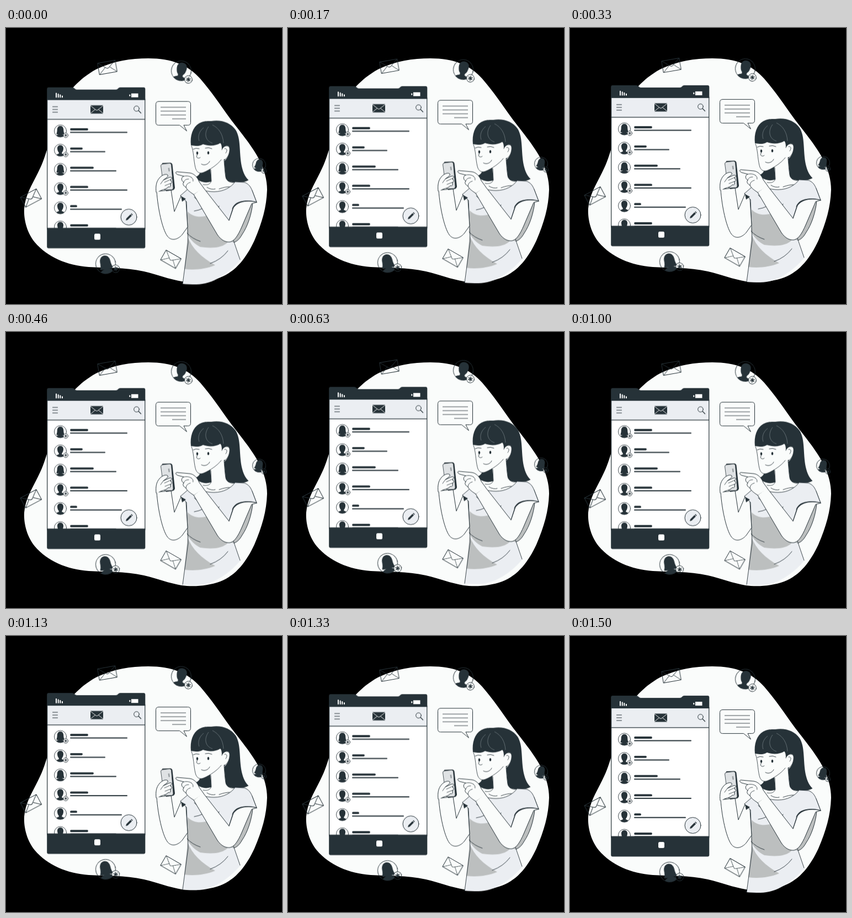
Animation of 500 by 500 pixels, one loop 1540 ms. Source, as an HTML page:

```html
<!DOCTYPE html>
<html lang="en">
<head>
<meta charset="utf-8">
<title>Mail contacts</title>
<style>
html, body { margin: 0; width: 100%; height: 100%; overflow: hidden; background: #000; }
svg { display: block; width: 100vw; height: 100vh; }
.ink { fill: #263238; }
.pale { fill: #ebeef2; }
.skin { fill: #fafcfb; }
.shade { fill: #bcbfbf; }
.line { fill: none; stroke: #263238; stroke-linecap: round; stroke-linejoin: round; }
.edge { stroke: #263238; stroke-linejoin: round; stroke-linecap: round; }
</style>
</head>
<body>
<svg viewBox="0 0 500 500">
  <defs>
    <clipPath id="disc"><circle r="18"/></clipPath>
    <clipPath id="list"><path d="M75 165H252V362H75Z"/></clipPath>
    <mask id="bite" maskUnits="userSpaceOnUse" x="-20" y="-20" width="50" height="50">
      <path fill="#fff" d="M-20-20H30V30H-20Z"/><circle cx="15.9" cy="12.7" r="7"/>
    </mask>
    <g id="man">
      <path class="ink" d="M-9-4C-9.500-11-6-15 0-15C6-15 9.500-11 9-4C8.500 1 7 5 4.500 7V10C8 11 13 13 15 18H-15C-13 13-8 11-4.500 10V7C-7 5-8.500 1-9-4Z"/>
    </g>
    <g id="woman">
      <path class="ink" d="M-9.500-3C-9.500-10-6-15 0-15C6-15 9.500-10 9.500-3C9.500 3 11 6 12 9C9 10 6 10 4 9.500C9 11 13 13 15 18H-15C-13 13-9 11-4 9.500C-6 10-9 10-12 9C-11 6-9.500 3-9.500-3Z"/>
    </g>
    <g id="badge">
      <circle class="line" cx="15.900" cy="12.700" r="7"/>
      <path class="line" stroke-width="1.600" d="M15.900 9V16.400M12.700 10.900L19.100 14.500M12.700 14.500L19.100 10.900"/>
    </g>
    <g id="letter">
      <path class="line" d="M-16-10.500H16V10.500H-16ZM-16-10.500L-2 1Q0 2.500 2 1L16-10.500M-16 10.500L-4-.5M16 10.500L4-.5"/>
    </g>
  </defs>

  <path class="skin" d="M258 55C300 55 330 67 352 92C372 115 388 139 406 164C420 183 446 213 459 239C468 257 473 275 473 293C472 325 464 352 450 385C436 415 417 441 388 452C366 460 340 462 318 459C295 455 275 447 250 441C215 433 180 435 150 433C110 430 75 415 52 388C36 368 32 343 33 327C35 303 46 286 58 262C68 242 71 230 75 218C85 185 88 150 112 120C122 105 142 86 165 74C195 60 225 55 258 55Z"/>

  <g id="float">
    <use href="#letter" transform="translate(183.700 70.800) rotate(-10)"/>
    <use href="#letter" transform="translate(45.300 307.500) rotate(-28) scale(1.020 .98)"/>
    <use href="#letter" transform="translate(298.800 418.500) rotate(30) scale(.97)"/>
    <g id="faces"></g>

    <g id="phone">
      <path d="M75 130H252V365H75Z" fill="#fff"/>
      <path class="pale" d="M75 130H252V165H75Z"/>
      <path class="line" d="M74.700 128V364M251.800 128V364M75 164.800H252" stroke-width="1.200"/>
      <path class="ink" d="M74.200 130V110Q74.200 107 77.200 107H120Q122.500 107 124 108.800T128 111H199Q201.500 111 203 109T207 107H249.300Q252.300 107 252.300 110V130Z"/>
      <path class="ink" d="M74.200 361.500H252.300V395.500Q252.300 398.500 249.300 398.500H77.200Q74.200 398.500 74.200 395.500Z"/>
      <rect x="160" y="372" width="11" height="11" rx="2.500" fill="#fff"/>
      <path fill="#fff" d="M90 117h2v8.500h-2zM93.700 118.500h2v7h-2zM97.300 120h2v5.500h-2zM101 122h2v3.500h-2zM227 118h12.500v7H227zM223.300 120h2v3h-2z"/>
      <path class="line" d="M84.500 142H93.500M84.500 147H93.500M84.500 152H93.500"/>
      <path class="ink" d="M153 139.500H176V154.500H153Z"/>
      <path d="M153 140L163 148Q164.500 149 166 148L176 140M153 154L161.500 147M176 154L167.500 147" fill="none" stroke="#fff" stroke-width=".9"/>
      <circle class="line" cx="236.500" cy="145.500" r="4.800"/>
      <path class="line" d="M240 149L244.500 153.500" stroke-width="1.300"/>
      <g id="rows" clip-path="url(#list)"></g>
      <circle class="pale edge" cx="222.500" cy="342" r="14.500"/>
      <path class="ink" d="M217 348L218 344.500L225.500 337L228 339.500L220.500 347ZM226.200 336.300L227.300 335.200L229.800 337.700L228.700 338.800Z"/>
    </g>

    <path class="skin edge" d="M276.500 132.500H329.500Q334.500 132.500 334.500 137.500V170.500Q334.500 175.500 329.500 175.500H322L327.500 186L314.500 175.500H276.500Q271.500 175.500 271.500 170.500V137.500Q271.500 132.500 276.500 132.500Z"/>
    <path d="M280 143H326M280 150H326M280 157H326M301 164H326" stroke="#80878a" stroke-width="1.500"/>

    <g id="girl">
      <path class="ink" d="M335 212C333 195 338 179 350 172C358 167 368 168 372 168C390 165 407 171 416 184C426 200 422 225 427 250C430 263 434 270 439.500 275C430 281 410 280 402 277L392 262L371 278C360 281 350 278 342 270C350 267 352 262 352 258L360 215Z"/>
      <path class="skin" d="M370 253L372 277Q369 285 357 283L340 290L375 300L412 290L416 279Q401 281 398 271L395 238L388 236Z"/>
      <path class="skin" d="M336 213C340 222 340 240 343 252C345 261 351 264 358 261C370 256 383 247 390 238L396 240C402 235 406 225 405 217C404 211 396 211 391 220C391 213 390 209 388 208C380 213 368 214 357 210C350 214 343 214 336 213Z"/>
      <path class="line" d="M336 213C340 222 340 240 343 252C345 261 351 264 358 261C370 256 383 247 390 238M391 220C392 213 403 210 405 217C406 225 402 235 396 238M396 218C400 217 402 221 398 226M371 256L372 277C369 284 363 284 357 283M395 238C396 255 397 266 399 273Q404 281 415 279" stroke-width=".8"/>
      <path class="line" d="M346 224C348 229 344 232 346 234C348 236 351 235 352 234M354 246C359 249 366 247 369 241M339 219Q344 216 350 218M361 217Q367 215 373 218M364 288Q372 293 379 291M386 291Q397 287 405 287" stroke-width=".9"/>
      <ellipse class="ink" cx="346.500" cy="226" rx="1.800" ry="2.800"/>
      <ellipse class="ink" cx="366.500" cy="225.500" rx="1.800" ry="2.800"/>
      <circle class="ink" cx="396" cy="238" r="1"/>
      <path d="M358 180C350 186 347 196 350 204M367 178C358 190 361 204 374 208M374 175C386 181 393 192 394 208" fill="none" stroke="#7c878c" stroke-width=".7"/>

      <path class="shade edge" d="M447 316C445 338 437 360 428 373C422 384 416 388 408 389L400 375L425 318Z"/>
      <path class="pale" d="M338 284C347 291 361 296 377 296C394 296 408 288 415 278L432 279C440 282 443 287 446 294L454 315L425 317L412 326L404 386L413 388L424 420C404 444 374 464 345 464Q330 464 320 463L330 388L327 314L316 303Z"/>
      <path class="shade" d="M329 332C341 344 355 342 366 339L385 370L402 387C393 398 372 399 352 396C342 391 334 383 328 373ZM329 377C337 399 354 415 379 429C360 437 340 438 323 436Z"/>
      <path class="line" d="M338 284C347 291 361 296 377 296C394 296 408 288 415 278L432 279C440 282 443 287 446 294L454 315M338 284L316 303L327 314L330 388L320 463M412 384L424 419M341 331Q349 330 357 326M402 403Q390 419 370 426M328 371Q337 381 352 386M341 306Q351 316 365 319M375 334Q383 330 386 322" stroke-width=".9"/>

      <path class="skin edge" d="M273 296C275 326 283 363 292 376C300 387 312 382 319 374L329 360L326 313L317 304L305 332L299 293Z"/>
      <path class="skin edge" d="M454 315C438 311 420 313 412 325L404 348L357 288L340 301L383 374C390 384 398 388 406 387C414 385 420 376 427 360L445 318Z"/>
      <path class="pale" d="M454 315C438 309 420 312 410 326L405 315L415 300L446 294Z"/>
      <path class="line" d="M454 315C438 310 420 312 411 326L404 348M446 294L454 315M327 314L316 303"/>
      <path class="ink" d="M440 313C425 313 417 317 409 328C413 316 425 311 440 313ZM317 304L326 309L319 314Z"/>

      <path class="ink" d="M283 244L298 243.500Q301 244 301.500 247L306 289Q305 293 301 293.500L290 295Z"/>
      <path d="M283 246L296 244.500Q299 244.500 299.500 247L303 289Q303 292 300 292.500L290 293Q286 293 286 290L280.500 249Q280.500 246.500 283 246Z" fill="#dfe2e4" class="edge" stroke-width=".8"/>
      <path d="M293.500 253L296 252.700L297 259L294.500 259.300Z" fill="#9aa0a3"/>
      <path class="skin edge" d="M272 297C271 286 272 278 278 271C283 265 291 263 293 266C295 269 288 272 285 275L296 270C301 269 302 272 298 274L299 277C302 278 300 281 298 281L298 284C299 287 296 288 294 287C291 292 283 292 278 295"/>
      <path class="line" d="M285 275L280 282M298 274L287 279M298 281L288 285" stroke-width=".8"/>

      <path class="skin edge" d="M340 301C334 297 328 293 326 288C322 286 319 282 322 279C317 276 317 270 322 268L311 265C306 263 307 259 311 260L333 262C341 263 347 270 350 278L358 289"/>
      <path class="line" d="M322 268Q330 266 336 270M322 279Q323 273 331 273M326 288Q326 281 334 279M336 270Q340 273 339 277" stroke-width=".8"/>
    </g>
  </g>
</svg>
<script>
const $ = id => document.getElementById(id);

// One round portrait: centre, radius, tilt, optional badge
function face(kind, x, y, r, tilt, badge) {
  const stroke = Math.min(18 / r, 1.4);
  return `<g transform="translate(${x} ${y}) rotate(${tilt}) scale(${r / 18})" stroke-width="${stroke}">
    <g ${badge ? 'mask="url(#bite)"' : ''}>
      <g clip-path="url(#disc)"><use href="#${kind}"/></g>
      <circle class="line" r="18"/>
    </g>${badge ? '<use href="#badge"/>' : ''}</g>`;
}

$('faces').innerHTML =
  face('man', 317.5, 77, 18, 12, true) +
  face('woman', 180.5, 426.5, 18, -12, true) +
  face('woman', 458.5, 247.5, 12, 12, true);

// kind, title end, text end, badge
const rows = [
  ['woman', 149, 220, true], ['man', 139, 180, true], ['woman', 159, 200, false],
  ['man', 149, 220, true], ['man', 129, 210, false], ['man', 149, 200, false]
];
$('rows').innerHTML = rows.map(([kind, title, text, badge], i) => {
  const y = 186 + i * 34.8;
  return face(kind, 98.5, y, 11, 0, badge) +
    `<path class="line" stroke-width="3.8" d="M118 ${y - 3}H${title - 2}"/>
     <path class="line" stroke-width="2" d="M117 ${y + 2.6}H${text - 1}"/>`;
}).join('');

const shift = y => ({ transform: `translateY(${y}px)` });
$('float').animate([shift(1.1), shift(-8.9), shift(1.1)], {
  duration: 1540, iterations: Infinity, easing: 'steps(37, jump-start)'
});
</script>
</body>
</html>
```
